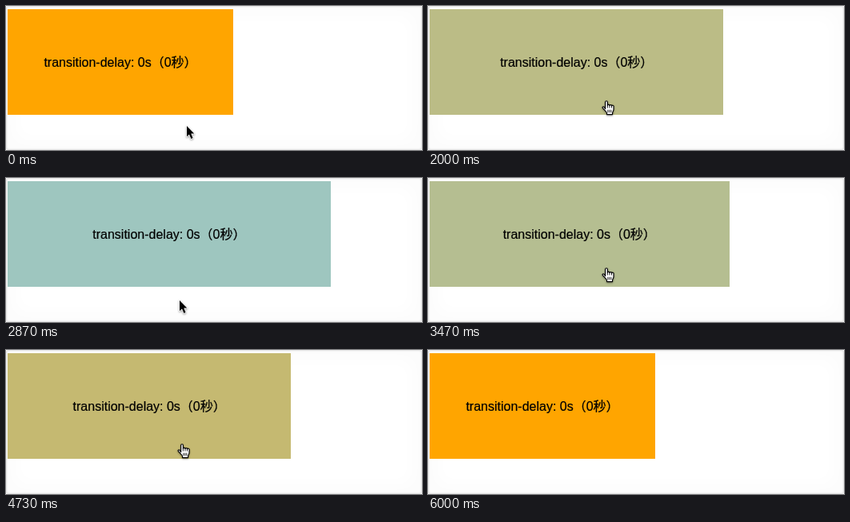
An HTML page that plays this animation: 520x180 px, repeating every 6.47 s.

```html
<!DOCTYPE html>
<html lang="ja">
<head>
<meta charset="utf-8">
<title>transition-delay</title>
<style>
  html, body { margin: 0; width: 100%; height: 100%; overflow: hidden; background: #fff; }
  #stage { position: absolute; left: 0; top: 0; width: 520px; height: 180px; overflow: hidden; background: #fff; }
  #frame {
    position: absolute; inset: 0; border-radius: 3px;
    box-shadow: inset 0 0 2px 1px #e0e0e0, inset 0 0 20px 12px rgba(0, 0, 0, .014);
  }
  #box {
    position: absolute; left: 2px; top: 4px; width: 282px; height: 132px;
    background: rgb(255, 165, 0); color: #000; text-align: center; white-space: nowrap;
    font: 16px/134px "Liberation Sans", Arial, "Noto Sans CJK JP", "Noto Sans CJK", sans-serif;
    -webkit-text-stroke: .2px #000;
  }
  svg { position: absolute; left: 0; top: 0; width: 520px; height: 180px; }
  #cursor { filter: drop-shadow(0 1px 1px rgba(0, 0, 0, .4)); }
</style>
</head>
<body>
<div id="stage">
  <div id="frame"></div>
  <div id="box">transition-delay: 0s（0秒）</div>
  <svg viewBox="0 0 520 180">
    <g id="cursor">
      <path id="arrow" d="M0 0V13.2L3 10.4L5.4 16L7.6 15L5.3 9.6H9.3Z"
        fill="#000" stroke="#fff" stroke-width="1.6" stroke-linejoin="round" paint-order="stroke"/>
      <g id="hand" transform="translate(-5 -2) scale(1.06)" stroke="#000" stroke-linecap="round" stroke-linejoin="round">
        <path fill="#fff" stroke-width="1.1" d="M4.4 10V2a1.3 1.3 0 0 1 2.6 0V6a1.2 1.2 0 0 1 2.4 .2a1.2 1.2 0 0 1 2.4 .5a1.2 1.2 0 0 1 2.4 .8V10.5c0 2-1.2 2.6-1.4 4.5V16.6H6.2V15C5.6 13 2.6 10.8 1.2 8.8C.6 7.6 2 6.9 3 7.8Z"/>
        <path fill="none" stroke-width=".8" d="M7 6V8.6M9.4 6.3V8.6M11.8 6.8V8.6M7.4 11.4V14M9.3 11.4V14M11.2 11.4V14"/>
      </g>
    </g>
  </svg>
</div>
<script>
  const LOOP = 6470, STEP = 200 / 3, DURATION = 500, MOVE = 100, CURSOR_GONE = 5400;
  const ORANGE = [255, 165, 0], SKY = [135, 206, 235];
  // times at which the pointer enters and leaves the box, in turn
  const crossings = [1835, 2791, 3288, 3921, 4591, 5122];
  // where the pointer rests before, between and after the crossings
  const rests = [[226, 150], [222, 120], [217, 154], [222, 114], [218, 148], [219, 119], [212, 155]];

  const $ = id => document.getElementById(id);
  const box = $('box'), cursor = $('cursor'), arrow = $('arrow'), hand = $('hand');
  const clamp = x => Math.min(1, Math.max(0, x));
  const mix = (a, b, k) => a + (b - a) * k;
  const smooth = x => x * x * (3 - 2 * x);
  const bezier = (a, b, s) => 3 * a * s * (1 - s) ** 2 + 3 * b * s * s * (1 - s) + s ** 3;

  // CSS "ease": cubic-bezier(.25, .1, .25, 1)
  function ease(x) {
    if (x <= 0) return 0;
    if (x >= 1) return 1;
    let lo = 0, hi = 1;
    for (let i = 0; i < 24; i++) {
      const mid = (lo + hi) / 2;
      if (bezier(.25, .25, mid) < x) lo = mid; else hi = mid;
    }
    return bezier(.1, 1, lo);
  }

  // each entry grows the box, each exit shrinks it
  const growth = t => crossings.reduce(
    (sum, start, i) => sum + (i % 2 ? -1 : 1) * ease((t - start) / DURATION), 0);

  const pointer = t => crossings.reduce((pos, time, i) => {
    const k = smooth(clamp((t - time + MOVE) / (2 * MOVE)));
    return pos.map((v, axis) => mix(v, rests[i + 1][axis], k));
  }, rests[0]).map(Math.round);

  function draw(now) {
    const t = Math.floor(now % LOOP / STEP + .05) * STEP;
    const k = clamp(growth(t));
    box.style.width = mix(282, 432, k) + 'px';
    box.style.backgroundColor = `rgb(${ORANGE.map((c, i) => Math.round(mix(c, SKY[i], k)))})`;

    const over = crossings.filter(time => time <= t).length % 2 === 1;
    cursor.setAttribute('transform', `translate(${pointer(t).join(' ')})`);
    cursor.style.display = t < CURSOR_GONE ? '' : 'none';
    arrow.style.display = over ? 'none' : '';
    hand.style.display = over ? '' : 'none';
  }

  const begin = performance.now();
  function tick() {
    draw(performance.now() - begin);
    requestAnimationFrame(tick);
  }
  tick();
</script>
</body>
</html>
```
